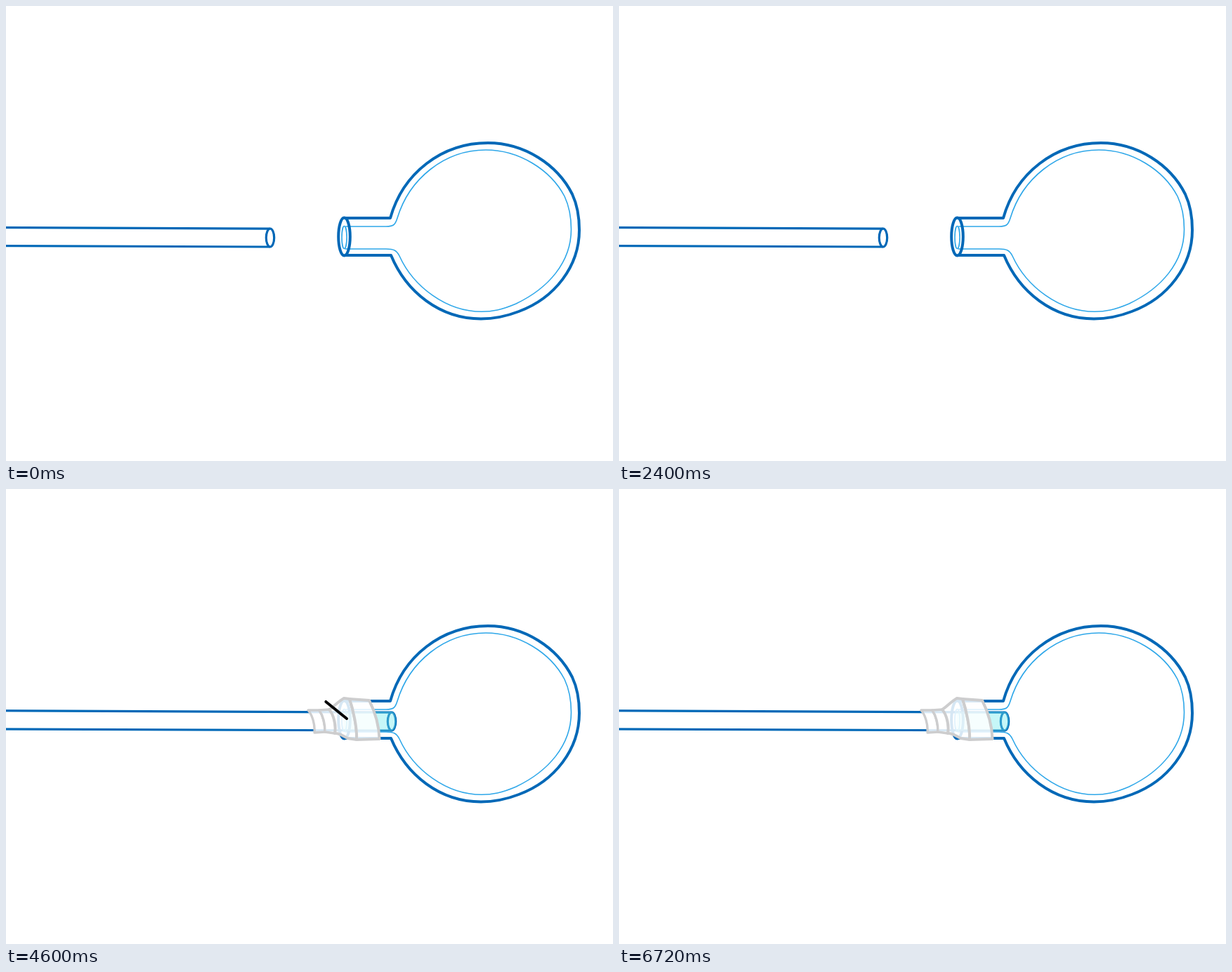
Recreate the animation shown at these times as an HTML page. Size 864x648 px, loop 7.72 s.

```html
<!DOCTYPE html>
<html lang="zh-Hant">
<head>
<meta charset="utf-8">
<title>氣囊與軟管</title>
<style>
html, body { margin: 0; width: 100%; height: 100%; overflow: hidden; background: #fff; }
svg { display: block; width: 100vw; height: 100vh; }
path, ellipse { fill: none; stroke-linecap: round; stroke-linejoin: round; }
.wall { stroke: #0068b7; stroke-width: 4; }
.tube { stroke: #0068b7; stroke-width: 3.2; }
.lining { stroke: #2ea7e9; stroke-width: 1.6; }
.leader { stroke: #000; stroke-width: 4; stroke-dasharray: 1 2; }
.tape { fill: #fff; fill-opacity: .84; stroke: #cdcdce; stroke-width: 4; }
.tape.thin { stroke-width: 3.4; }
.glow { fill: #70ecee; fill-opacity: .4; }
text { font: 700 43px "Noto Sans CJK TC", "Noto Sans CJK", sans-serif; }

/* One shared 7720 ms timeline: percentage = ms / 77.2 */
.tube, .leader, .joint, .parts, .binding, text {
  animation: 7.72s linear infinite;
}
.parts { animation-name: parts; }
.binding { animation-name: binding; }
.parts .leader { animation-name: draw-parts; }
.binding .leader { animation-name: draw-binding; }
.parts text { animation-name: rise-parts; }
.binding text { animation-name: rise-binding; }
.tube { animation-name: insert; }
.joint { animation-name: wrap; }

@keyframes parts { 0%, 25% { opacity: 1 } 31.08%, 100% { opacity: 0 } }
@keyframes binding { 0%, 80.57% { opacity: 1 } 86.95%, 100% { opacity: 0 } }
@keyframes draw-parts {
  0%, .2% { stroke-dashoffset: 1.04 }
  7%, 100% { stroke-dashoffset: 0 }
}
@keyframes draw-binding {
  0%, 58.23% { stroke-dashoffset: 1.04 }
  65.09%, 100% { stroke-dashoffset: 0 }
}
@keyframes rise-parts {
  0%, 6.74% { opacity: 0; transform: translateY(9px) }
  11.9%, 100% { opacity: 1; transform: none }
}
@keyframes rise-binding {
  0%, 64.9% { opacity: 0; transform: translateY(9px) }
  70.45%, 100% { opacity: 1; transform: none }
}
@keyframes insert {
  0%, 33.55% { transform: none; animation-timing-function: cubic-bezier(.42, 0, .58, 1) }
  45.08%, 100% { transform: translate(173px, 1px) }
}
@keyframes wrap {
  0%, 45.34% { opacity: 0; animation-timing-function: cubic-bezier(.35, .5, .65, 1) }
  57.9%, 100% { opacity: 1 }
}
</style>
</head>
<body>
<svg viewBox="0 0 864 648">
  <g class="tube">
    <path d="M-200 314.6 L375 317.2 M-200 340.8 L375 343"/>
    <ellipse cx="376" cy="330" rx="5.7" ry="13"/>
  </g>

  <path class="lining" d="M484 314 H541 C551 314 554 312 557 302 C574 246 624 205 683 205
    C730 205 775 233 795 271 C802 286 804.5 303 804.5 318 C804.5 365 772 402 726 424
    C705 433 692 435.3 677 435.3 C627 435.3 580 400 560 356 C556 348 552 346 541 346 H483"/>
  <ellipse class="lining" cx="481.5" cy="329.5" rx="3.5" ry="16"/>
  <path class="wall" d="M483 302 H547 C565 238 620 195 686 195 C738 195 785 226 806 268
    C813 283 816 301 816 319 C816 371 781 416 730 435 C712 442 694 445.5 676 445.5
    C618 445.5 570 408 548 355 H483"/>
  <ellipse class="wall" cx="481.5" cy="328.5" rx="8.3" ry="27"/>

  <g class="joint">
    <path class="glow" d="M480 317 H549 C557 318 557 343 549 344.5 H480 Z"/>
    <path class="tape thin" d="M430 315 L446 315 C451 323 454 335 454 346 L439 347 C440 335 436 322 430 315 Z"/>
    <path class="tape thin" d="M446 315 L460 314 C467 322 470 338 468 348 L454 346 C454 335 451 323 446 315 Z"/>
    <path class="tape" d="M460 314 C465 312 472 303 481 298 L489 299 C494 314 500 340 499 357
      L486 355 C478 351 474 347 468 348 C470 338 467 322 460 314 Z"/>
    <path class="tape" d="M489 299 L517 301 C525 317 531 338 531.5 356 L499 357 C500 340 494 314 489 299 Z"/>
  </g>

  <g class="parts">
    <path class="leader" pathLength="1" d="M647 279 L525 181 H454"/>
    <path class="leader" pathLength="1" d="M244 332 L245 401 L354 488 L390 489"/>
    <text x="342.5" y="198">氣囊</text>
    <text x="410.5" y="506">軟管</text>
  </g>

  <g class="binding">
    <path class="leader" pathLength="1" d="M485 327 L363 228 H292"/>
    <text x="186.5" y="240.5">膠帶</text>
  </g>
</svg>
</body>
</html>
```
